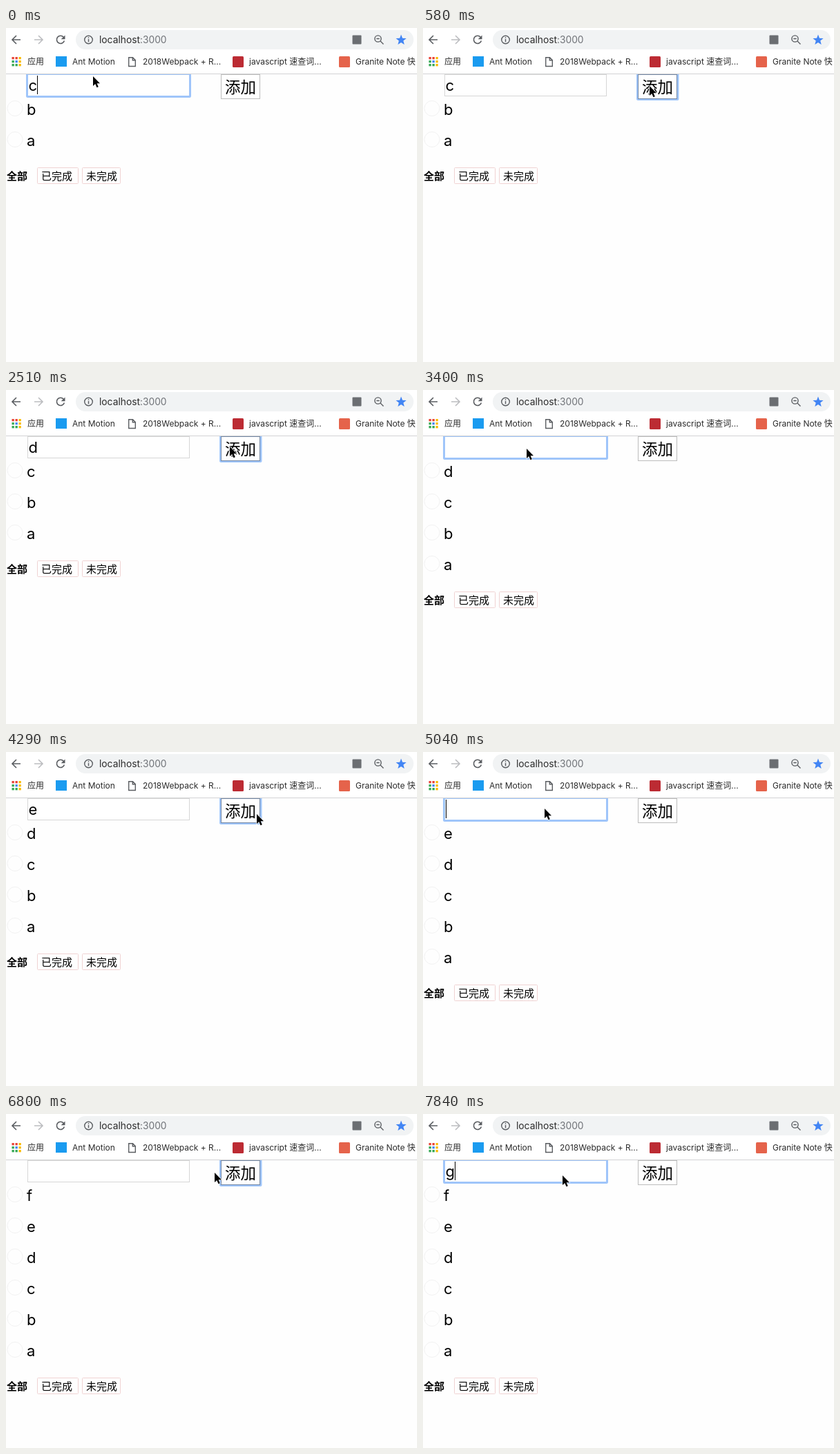
An HTML page that plays this animation: 595 px wide and 484 px high, repeating every 7990 ms.

```html
<!DOCTYPE html>
<html lang="zh">
<head>
<meta charset="utf-8">
<title>Todo list</title>
<style>
  html, body { margin: 0; width: 100%; height: 100%; overflow: hidden; background: #fefefe; }
  svg { display: block; }
  text { font: 12px Inter, "Noto Sans CJK SC", "Noto Sans CJK", sans-serif; fill: #2b2b2b; white-space: pre; }
  .big { font-size: 22px; fill: #000; }
  .mid { font-size: 15px; fill: #000; }
  .line { fill: none; stroke: #5a5d61; stroke-width: 1.6; }
  .thin { stroke-width: 1.4; }
  .ring { fill: none; stroke: #9fc5fa; stroke-width: 3; }
</style>
</head>
<body>
<svg width="595" height="484" viewBox="0 0 595 484">
  <!-- page -->
  <rect id="inputBox" x="31.5" y="67.5" width="234" height="31" fill="#fff"/>
  <rect id="inputRing" class="ring" x="30.5" y="66.5" width="236" height="33" rx="1"/>
  <text id="value" class="big" x="32.5" y="91"></text>
  <rect id="caret" y="69" width="1" height="27"/>
  <rect id="buttonRing" class="ring" x="310.5" y="65.5" width="58.5" height="38" rx="1"/>
  <rect id="button" x="311.5" y="67.5" width="56" height="35" fill="#fff"/>
  <text class="big" x="317" y="93.5" style="font-size:22.5px">添加</text>
  <g id="list"></g>
  <g id="filters">
    <text class="mid" x="1" y="18" style="font-weight:700">全部</text>
    <g fill="none" stroke="#f0d3d3">
      <rect x="45.5" y=".5" width="59" height="23" rx="1"/>
      <rect x="110.5" y=".5" width="55" height="23" rx="1"/>
    </g>
    <text class="mid" x="51" y="18">已完成</text>
    <text class="mid" x="116" y="18">未完成</text>
  </g>

  <!-- browser bar -->
  <rect width="595" height="67" fill="#fff"/>
  <rect y="66" width="595" height="1" fill="#d2d3d4"/>
  <rect x="101" y="3" width="489" height="28" rx="14" fill="#f1f3f4"/>
  <path class="line" d="M21 17H9.5M15 11l-6 6 6 6"/>
  <path class="line" d="M41 17H52.5M47 11l6 6-6 6" style="stroke:#bcbdc0"/>
  <path class="line" d="M83.3 13.2A5.6 5.6 0 1 0 84.4 18.4"/>
  <path d="M85.5 10.5v5.8h-5.8z" fill="#5a5d61"/>
  <circle class="line thin" cx="119.5" cy="17" r="5.8"/>
  <path class="line thin" d="M119.5 16v4.2M119.5 13.3v1.5"/>
  <text x="135" y="22" style="font-size:13.8px">localhost<tspan fill="#707378">:3000</tspan></text>
  <rect x="501.5" y="10.5" width="13" height="13" rx="1" fill="#6b6e72"/>
  <circle class="line thin" cx="538.5" cy="15.5" r="4.6"/>
  <path class="line thin" d="M542 19l4.5 4.5M536.3 15.5h4.4"/>
  <path id="star" fill="#4285f4"/>

  <!-- bookmarks -->
  <g id="apps"></g>
  <text x="31" y="53">应用</text>
  <rect x="72" y="41" width="16" height="15" fill="#1a9bf0"/>
  <text x="96" y="53">Ant Motion</text>
  <path class="line thin" d="M177.7 42.7h5.8l3.8 3.8v9h-9.6zM183.3 42.7v4h4"/>
  <text x="198" y="53">2018Webpack + R...</text>
  <rect x="328" y="41" width="16" height="16" rx="1.5" fill="#bc2b33"/>
  <text x="352" y="53">javascript 速查词...</text>
  <rect x="482" y="41" width="16" height="16" rx="1.5" fill="#e5634b"/>
  <text x="506" y="53">Granite Note 快</text>

  <path id="pointer" d="M0 0V14l3.2-3 2.3 5.2 2.3-1-2.2-5h4.4z" stroke="#fff" stroke-width="1.2" paint-order="stroke"/>
</svg>
<script>
const LOOP = 7990, STEP = 147, BLINK = 440;
const $ = id => document.getElementById(id);

// Each round: type a letter, press the button, the item is added, focus goes back.
// The pointer travels from rest to target and on to the next round's rest.
const rounds = [
  { type: 0, press: 580, add: 730, back: 1170, rest: [126, 70], target: [328, 84] },
  { type: 1920, press: 2510, add: 2660, back: 2960, rest: [107, 87], target: [324, 82] },
  { type: 3850, press: 4290, add: 4590, back: 5040, rest: [150, 85], target: [363, 90] },
  { type: 5780, press: 6360, add: 6510, back: 6950, rest: [176, 82], target: [337, 84] },
  { type: 7840, press: LOOP, add: LOOP, back: LOOP, rest: [202, 89], target: [202, 89] }
];

// Eased progress from a to b, held in steps of about STEP ms
function progress(t, a, b) {
  const n = Math.round((b - a) / STEP) || 1;
  const k = Math.floor(Math.min(1, Math.max(0, (t - a) / (b - a))) * n) / n;
  return k * k * (3 - 2 * k);
}

const mix = (a, b, k) => a.map((v, i) => Math.round(v + (b[i] - v) * k));
const show = (id, on) => $(id).style.display = on ? "" : "none";

function draw(t) {
  const i = rounds.findLastIndex(r => r.type <= t);
  const { type, press, add, back, rest, target } = rounds[i];
  const next = rounds[i + 1] || rounds[i];
  const text = t < add ? "abcdefg"[i + 2] : "";
  const count = i + (t < add ? 2 : 3);
  const typing = t < press || t >= back;

  $("value").textContent = text;
  $("caret").setAttribute("x", Math.round(32.7 + (text ? $("value").getComputedTextLength() : 0)));
  show("caret", typing && t < back + BLINK);
  show("inputRing", typing);
  show("buttonRing", !typing);
  $("inputBox").setAttribute("stroke", typing ? "#e4edf9" : "#d6d6d6");
  $("button").setAttribute("stroke", typing ? "#bcbcbc" : "#7286a3");

  $("list").innerHTML = [..."abcdef"].slice(0, count).reverse().map((c, row) =>
    `<circle cx="13" cy="${116.5 + 45 * row}" r="11" fill="none" stroke="#f2f2f2"/>
     <text class="big" x="30" y="${126 + 45 * row}">${c}</text>`).join("");
  $("filters").setAttribute("transform", `translate(0 ${112 + 45 * count})`);

  const spot = t < add
    ? mix(rest, target, progress(t, type, press))
    : mix(target, next.rest, progress(t, add, back));
  $("pointer").setAttribute("transform", `translate(${spot})`);
}

$("star").setAttribute("d", "M" + Array.from({ length: 10 }, (_, i) => {
  const r = i % 2 ? 3.4 : 8, a = i * Math.PI / 5;
  return [572 + r * Math.sin(a), 17.5 - r * Math.cos(a)];
}).join("L") + "z");

const [red, yellow, green, blue] = ["#ea4335", "#fabb05", "#34a853", "#4285f4"];
$("apps").innerHTML = [red, red, yellow, green, blue, yellow, green, green, yellow].map((c, i) =>
  `<rect x="${8.5 + i % 3 * 5}" y="${42 + Math.floor(i / 3) * 5}" width="3.3" height="3.3" fill="${c}"/>`).join("");

const start = performance.now();
function tick() {
  draw((performance.now() - start) % LOOP);
  requestAnimationFrame(tick);
}
tick();
</script>
</body>
</html>
```
